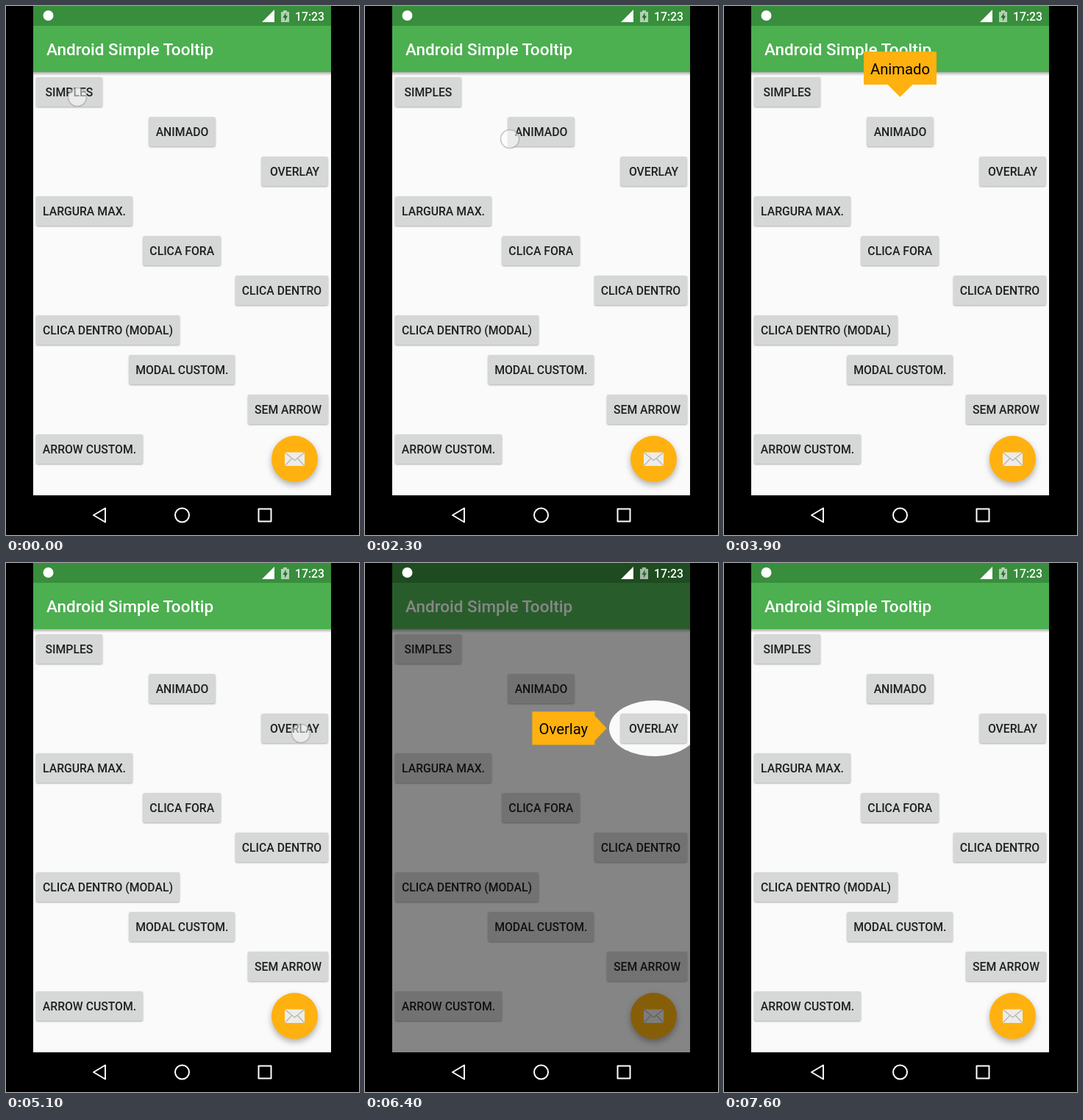
An HTML page for the animation above (8 s loop, 480 px wide and 720 px high).

```html
<!DOCTYPE html>
<html lang="pt">
<head>
<meta charset="utf-8">
<style>
  html, body { margin: 0; width: 100%; height: 100%; overflow: hidden; background: #000; }
  svg { display: block; width: 480px; height: 720px; font-family: Roboto, sans-serif; }
  .medium { font-weight: 500; font-size: 15.75px; }
  .button { fill: #d6d7d7; filter: drop-shadow(0 1.2px 1px rgba(0, 0, 0, .32)); }
  .label { fill: #1f1f1f; text-anchor: middle; }
  .tip path { fill: #ffb10f; }
  .tip text { font-size: 20.25px; text-anchor: middle; }
</style>
</head>
<body>
<svg viewBox="0 0 480 720">
  <defs>
    <linearGradient id="shade" x2="0" y2="1">
      <stop stop-opacity=".3"/>
      <stop offset="1" stop-opacity="0"/>
    </linearGradient>
  </defs>
  <rect width="480" height="720"/>
  <rect x="37" width="405" height="666" fill="#fafafa"/>
  <rect x="37" y="90" width="405" height="5" fill="url(#shade)"/>
  <rect x="37" y="27" width="405" height="63" fill="#4caf50"/>
  <rect x="37" width="405" height="27" fill="#388e3c"/>
  <text x="55" y="67" fill="#fff" font-size="22.5" font-weight="500">Android Simple Tooltip</text>

  <g id="buttons"></g>

  <circle cx="392.5" cy="616.5" r="31.5" fill="#ffb10f" style="filter:drop-shadow(0 4px 4px rgba(0,0,0,.3))"/>
  <rect x="379" y="607.5" width="27" height="18.5" rx="1" fill="#ececec"/>
  <path d="M379.5 608l13 10.5 13-10.5M379.5 625.5l9-9.5M405.500 625.500l-9-9.500" fill="none" stroke="#b9b4a6" stroke-width="1.2"/>

  <path id="overlay" d="M37 0H442V666H37ZM442 202.400A61 38 0 1 0 442 247.600Z" fill="#000" fill-opacity=".47" fill-rule="evenodd"/>

  <g fill="#fff">
    <circle cx="57.500" cy="13" r="7"/>
    <path d="M348 22H365V5Z"/>
    <path d="M374 8h3V6h5v2h3V22H374Z" opacity=".6"/>
    <path d="M380.500 9l-4 7h2.500v4.500l4-7h-2.500Z" fill="#286c2c"/>
    <text class="medium" x="393" y="19.500">17:23</text>
  </g>

  <g fill="none" stroke="#fff" stroke-width="2" stroke-linejoin="round">
    <path d="M135 683.500V702.500L119 693Z"/>
    <circle cx="239.500" cy="693" r="9.500"/>
    <rect x="343.500" y="684.500" width="17" height="17"/>
  </g>

  <g id="simple" class="tip">
    <path d="M169 94.500h91v45h-91v-5.500L152.500 117 169 100Z"/>
    <text x="214.500" y="125">Simples</text>
  </g>
  <g id="animated" class="tip">
    <path d="M190 66.800h99v45H256.500L239.500 128.500 222.500 111.800H190Z"/>
    <text x="239.500" y="98">Animado</text>
  </g>
  <g id="side" class="tip">
    <path d="M226.300 202.300h85v5.500L327.500 225 311.300 242v5.500h-85Z"/>
    <text x="268.800" y="233">Overlay</text>
  </g>

  <circle id="touch" r="12.500" fill="#fff" fill-opacity=".5" stroke="#8f9696" stroke-opacity=".5" stroke-width="1.600"/>
</svg>
<script>
const LOOP = 8000, STEP = 100, SWING = 5.6, HALF = 800;
const $ = id => document.getElementById(id);

const buttons = [
  ['SIMPLES', 41, 90], ['ANIMADO', 194.5, 90], ['OVERLAY', 347.5, 90],
  ['LARGURA MAX.', 41, 131], ['CLICA FORA', 186.5, 105.5], ['CLICA DENTRO', 312, 126],
  ['CLICA DENTRO (MODAL)', 41, 195], ['MODAL CUSTOM.', 167.5, 143.5],
  ['SEM ARROW', 329, 109], ['ARROW CUSTOM.', 41, 145]
];
$('buttons').innerHTML = buttons.map(([name, x, w], i) => {
  const y = 97 + 54 * i;
  return `<rect class="button" x="${x}" y="${y}" width="${w}" height="40" rx="2"/>
    <text class="medium label" x="${x + w / 2}" y="${y + 26}">${name}</text>`;
}).join('');

// Each tap: x, y, start, end; it fades over its last 200 ms.
const taps = [
  [97, 124, 0, 350], [159, 188.5, 1300, 1500], [197, 181, 2200, 2500],
  [283, 239, 4300, 4500], [401, 232, 5100, 5370]
];

const show = (id, on) => $(id).style.display = on ? '' : 'none';
const swing = (t, start) => -SWING * Math.cos(Math.PI * Math.max(0, t - start) / HALF);

function draw(t) {
  const overlayOn = t >= 5200 && t < 7400;
  show('simple', t >= 200 && t < 1300);
  show('animated', t >= 2400 && t < 4300);
  show('side', overlayOn);
  show('overlay', overlayOn);
  $('animated').setAttribute('transform', `translate(0 ${swing(t, 2440)})`);
  $('side').setAttribute('transform', `translate(${swing(t, 5250)} 0)`);

  const tap = taps.find(([, , start, end]) => t >= start && t < end);
  show('touch', tap);
  if (tap) {
    const [x, y, , end] = tap;
    $('touch').setAttribute('transform', `translate(${x} ${y})`);
    $('touch').setAttribute('opacity', Math.min(1, (end - t) / 200));
  }
}

const begin = performance.now();
function tick() {
  const t = (performance.now() - begin) % LOOP;
  draw(Math.floor(t / STEP) * STEP);
  requestAnimationFrame(tick);
}
tick();
</script>
</body>
</html>
```
